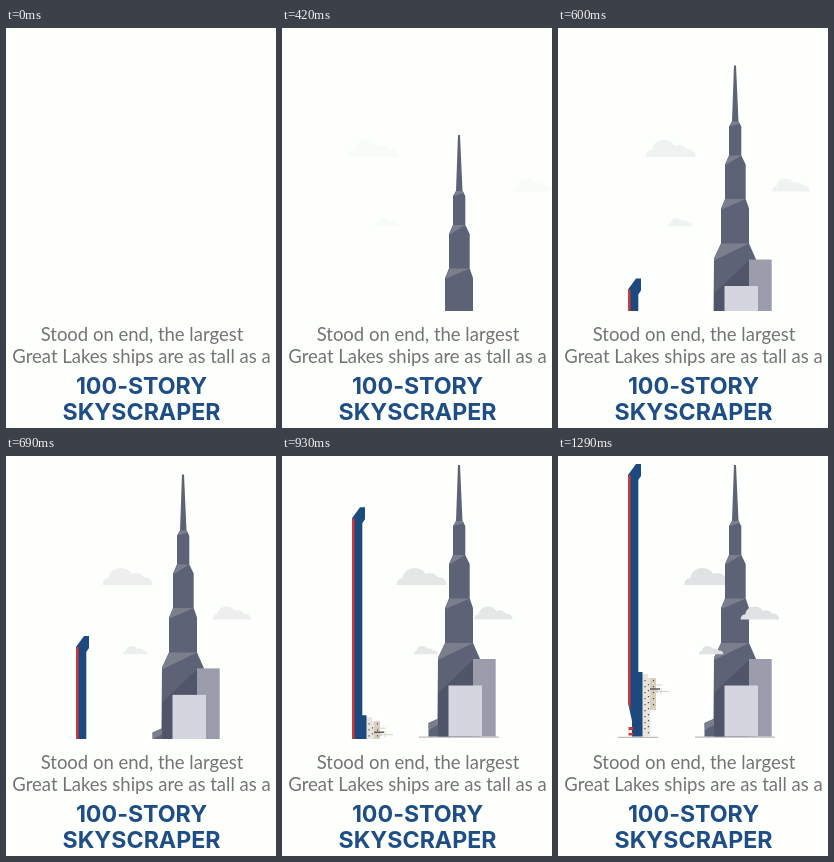
An HTML page for the animation above (1.35 s loop, 270 px wide and 400 px high).

```html
<!DOCTYPE html>
<html lang="en">
<head>
<meta charset="utf-8">
<title>Ship and skyscraper</title>
<style>
  html, body { margin: 0; width: 100%; height: 100%; overflow: hidden; background: #fdfffc; }
  svg { display: block; width: 100%; height: 100%; }
  text { text-anchor: middle; }
  .copy { font: 18.5px Lato, sans-serif; fill: #747474; }
  .head { font: 700 23.2px Inter, sans-serif; font-feature-settings: "calt" 0; fill: #1f4e86; }
</style>
</head>
<body>
<svg viewBox="0 0 270 400">
  <defs>
    <clipPath id="ground"><rect width="270" height="283"/></clipPath>
    <path id="puff" d="M0 17Q0 10.500 6 10Q8 0 18 0Q26 0 29 6Q36 3 41 9Q50 9 50 17Z" fill="#e1e2e4"/>
  </defs>
  <g clip-path="url(#ground)">
    <use id="cloudBack" href="#puff"/>

    <g id="tower">
      <path d="M137 281.200H217" stroke="#c3bab8" stroke-width="1.300"/>
      <path fill="#5d6277" d="M176 9H178L180.500 65L183.300 70V99L187.700 108V142.500L191 152V187L198.500 204V280.500H146.500V267L155.500 263L156 202L163 187V152L167 142.500V108L171 99V70L174 65Z"/>
      <g fill="#7b7e8d">
        <path d="M174 65H180.500L182 67L171.500 70Z"/>
        <path d="M171 99H183.300L167 109Z"/>
        <path d="M167 142.500H187.700L163.500 153Z"/>
        <path d="M163 187H191L156 204V202Z"/>
        <path d="M155.500 263H166L147 274L146.500 267Z"/>
      </g>
      <path fill="#50556a" d="M191 204L198.500 204V280.500H156V237Z"/>
      <rect x="191" y="203" width="22.700" height="77.500" fill="#9c9dac"/>
      <rect x="166.500" y="229.500" width="33.500" height="51" fill="#d4d5df"/>
    </g>

    <use id="cloudRight" href="#puff"/>
    <use id="cloudSmall" href="#puff"/>

    <g id="ship">
      <path d="M60 281.300H100" stroke="#c3bab8" stroke-width="1.300"/>
      <path fill="#e9e5dd" d="M84 218H90V222H92.500V280.500H80V240Z"/>
      <path fill="#d8cfbe" d="M92 222H98V234H99.500V237H98V254H92Z"/>
      <path d="M98 229H104M98 235.500H111M103 232V238" stroke="#d9d1c4" fill="none"/>
      <g stroke="#4b5059" stroke-width="1.200" stroke-dasharray="1.300 4.700">
        <path d="M87 224V278"/>
        <path d="M90.500 228V278"/>
        <path d="M95.500 224V252"/>
      </g>
      <path d="M92 233H102" stroke="#4b5059" stroke-width="1.400"/>
      <path fill="#1d4a7e" d="M70 19L78 8H83V20L80.300 24V216H84.500V280.500H74V265L70 247Z"/>
      <path fill="#d0393b" d="M70 20L72.500 18.500V254L70 247Z"/>
      <path fill="#d0393b" d="M70.500 271H75V274H70.500ZM70.500 277H75V279.500H70.500Z"/>
      <path fill="#e9e5dd" d="M70 274H74V277H70Z"/>
    </g>
  </g>

  <text class="copy" x="136" y="312.500">Stood on end, the largest</text>
  <text class="copy" x="135.500" y="335">Great Lakes ships are as tall as a</text>
  <text class="head" x="135.500" y="365.800">100-STORY</text>
  <text class="head" x="135.500" y="392">SKYSCRAPER</text>
</svg>
<script>
  const LOOP = 1350, STEP = 30;
  const el = id => document.getElementById(id);

  // Remaining distance of a quadratic ease-out, from 1 to 0
  const rest = (t, end, span) => Math.max(0, (end - t) / span) ** 2;

  function rise(id, distance) {
    el(id).setAttribute("transform", `translate(0 ${distance.toFixed(2)})`);
  }

  function drift(id, x, y, scale, left) {
    const node = el(id);
    node.setAttribute("transform", `translate(${x.toFixed(2)} ${y}) scale(${scale})`);
    node.setAttribute("opacity", Math.max(0, 1 - left).toFixed(3));
  }

  function draw(time) {
    const t = Math.floor((time % LOOP) / STEP) * STEP;
    rise("tower", 274 * rest(t, 811, 654));
    rise("ship", 275 * rest(t, 1171, 608));

    const left = rest(t, 1340, 1000);
    drift("cloudBack", 126.5 - 71 * left, 112, 1, left);
    drift("cloudRight", 182.5 + 57 * left, 150.5, 0.77, left);
    drift("cloudSmall", 141 - 57 * left, 190, 0.49, left);
  }

  const start = performance.now();
  function tick() {
    draw(performance.now() - start);
    requestAnimationFrame(tick);
  }
  tick();
</script>
</body>
</html>
```
